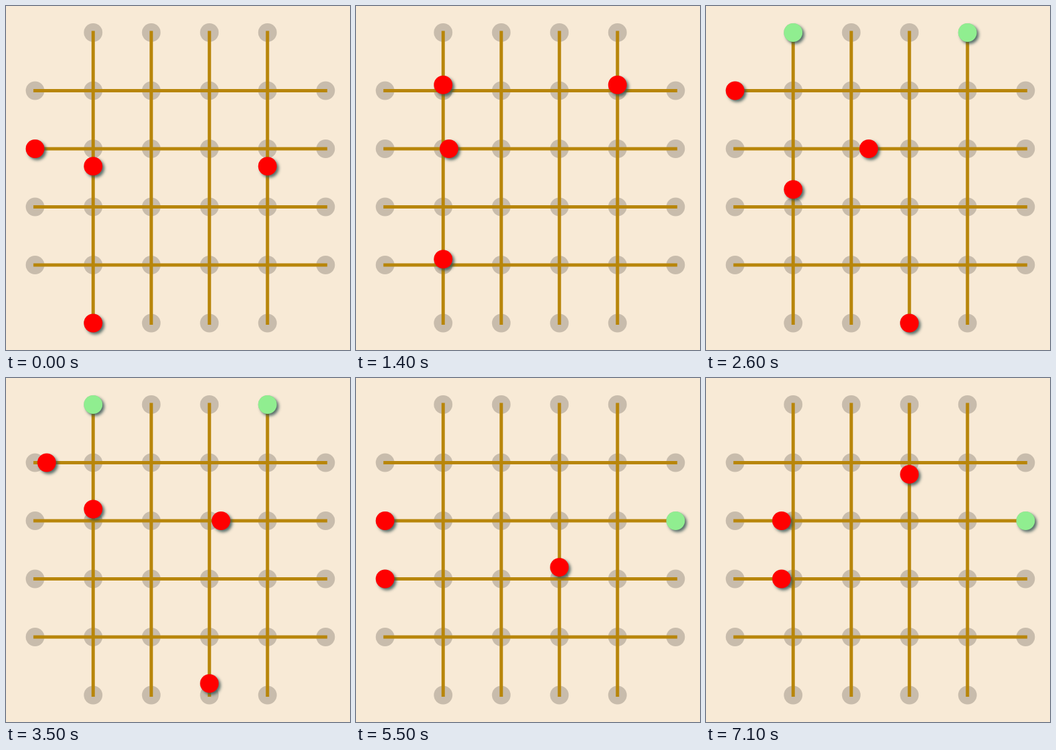
An HTML page with a canvas for the animation above (7.2 s loop, 518 px wide and 518 px high).

```html
<!DOCTYPE html>
<html lang="en">
<head>
<meta charset="utf-8">
<style>
  html, body { margin: 0; height: 100%; overflow: hidden; background: #f8ead6; }
  canvas { display: block; }
</style>
</head>
<body>
<canvas width="518" height="518"></canvas>
<script>
const ctx = document.querySelector('canvas').getContext('2d');
const LOOP = 7200, STEP = 100;
const CELL = 87.5, LEFT = 43.75, TOP = 40, RADIUS = 14;
const WAIT = 1000, CELL_TIME = 1000, REST = 3000, LAST = 5;

// Each ball appears, waits, then crosses its track ('row' runs right, 'col' runs up).
// A ball with `crash` stops at that many cells.
const balls = [
  { spawn: -3700, col: 1 },
  { spawn: -3700, col: 4 },
  { spawn: -700, row: 2 },
  { spawn: -700, col: 1, crash: 4 },
  { spawn: 2300, row: 1, crash: 1, merges: true },
  { spawn: 2300, col: 3 },
  { spawn: 5300, row: 2 },
  { spawn: 5300, row: 3 },
];

const px = col => LEFT + col * CELL;
const py = row => TOP + row * CELL;

function disc(col, row, color) {
  ctx.fillStyle = color;
  ctx.beginPath();
  ctx.arc(px(col), py(row), RADIUS, 0, Math.PI * 2);
  ctx.fill();
}

function line(c1, r1, c2, r2) {
  ctx.beginPath();
  ctx.moveTo(px(c1), py(r1));
  ctx.lineTo(px(c2), py(r2));
  ctx.stroke();
}

function drawBoard() {
  ctx.fillStyle = '#f8ead6';
  ctx.fillRect(0, 0, 518, 518);
  const isEdge = i => i === 0 || i === LAST;
  for (let col = 0; col <= LAST; col++)
    for (let row = 0; row <= LAST; row++)
      if (!(isEdge(col) && isEdge(row))) disc(col, row, '#c8bcac');
  ctx.strokeStyle = '#b8860b';
  ctx.lineWidth = 5;
  ctx.lineCap = 'square';
  for (let i = 1; i < LAST; i++) {
    line(0, i, LAST, i);
    line(i, 0, i, LAST);
  }
}

function drawBall({ spawn, row, col, crash, merges }, time) {
  const age = time - spawn;
  if (age < 0 || age >= WAIT + LAST * CELL_TIME + REST) return;
  const end = crash ?? LAST;
  const cells = Math.min(end, Math.max(0, (age - WAIT) / CELL_TIME));
  const stopped = cells === end;
  // Both crashed balls clear when the unobstructed trip would have ended.
  if (crash && age >= WAIT + LAST * CELL_TIME) return;
  if (merges && stopped) return;
  const color = !stopped ? '#f00' : crash ? '#000' : '#90ee90';
  if (row === undefined) disc(col, LAST - cells, color);
  else disc(cells, row, color);
}

function frame(now) {
  const time = Math.floor(now % LOOP / STEP) * STEP;
  drawBoard();
  ctx.save();
  ctx.shadowColor = 'rgba(47, 79, 79, .8)';
  ctx.shadowOffsetX = ctx.shadowOffsetY = 3;
  ctx.shadowBlur = 4;
  for (const ball of balls) drawBall(ball, time);
  ctx.restore();
}

const start = performance.now();
function tick() {
  frame(performance.now() - start);
  requestAnimationFrame(tick);
}
tick();
</script>
</body>
</html>
```
